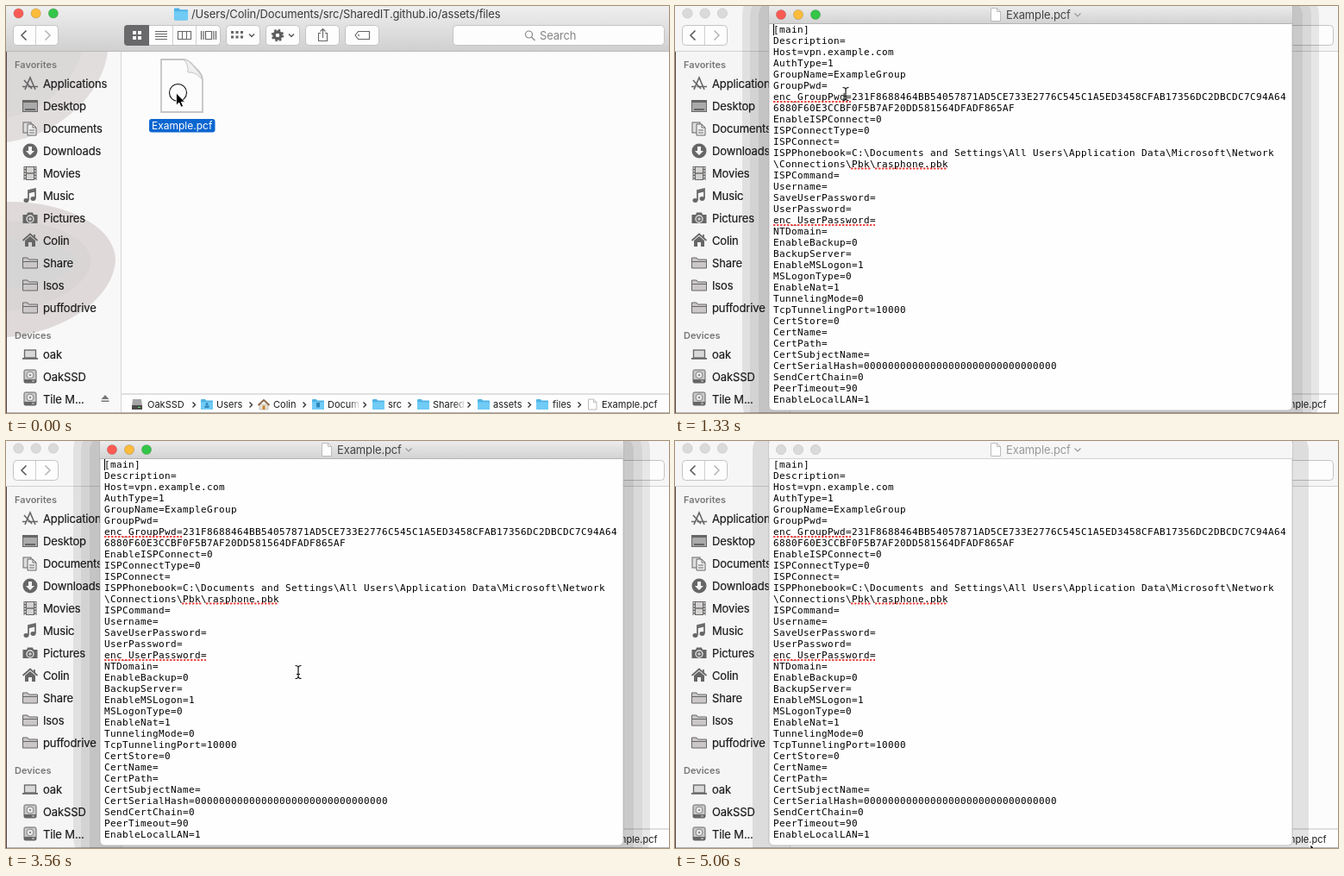
Animation of 769x472 px, one loop 5160 ms. Source, as an HTML page:

```html
<!DOCTYPE html>
<html lang="en">
<head>
<meta charset="utf-8">
<title>Opening a profile</title>
<style>
html, body { margin: 0; width: 100%; height: 100%; overflow: hidden; background: #fcfcfc; }
svg { display: block; width: 769px; height: 472px; }
.ui { font-family: Inter, "Open Sans", sans-serif; font-size: 13px; letter-spacing: -.13px; }
.side { stroke: #1c1c1c; stroke-width: .2px; }
.small { font-size: 11px; letter-spacing: 0; }
.head { font-weight: 600; }
.mono { font-family: "DejaVu Sans Mono", monospace; font-size: 11px; letter-spacing: .378px; white-space: pre; }
</style>
</head>
<body>
<svg id="stage" viewBox="0 0 769 472" xmlns="http://www.w3.org/2000/svg"></svg>
<script>
const LOOP = 5160;
const stage = document.getElementById('stage');

const rect = (x, y, w, h, fill, more = '') =>
  `<rect x="${x}" y="${y}" width="${w}" height="${h}" fill="${fill}" ${more}/>`;
const circle = (x, y, r, fill, more = '') =>
  `<circle cx="${x}" cy="${y}" r="${r}" fill="${fill}" ${more}/>`;
const line = (d, color = '#5f5f5f', width = 1.2, more = '') =>
  `<path d="${d}" fill="none" stroke="${color}" stroke-width="${width}" ${more}/>`;
const shape = (d, fill, more = '') => `<path d="${d}" fill="${fill}" ${more}/>`;
const label = (x, y, text, cls = '', fill = '#1c1c1c') =>
  `<text x="${x}" y="${y}" class="ui ${cls}" fill="${fill}">${text}</text>`;
const at = (x, y, body) => `<g transform="translate(${x} ${y})">${body}</g>`;
const group = (id, body) => `<g id="${id}">${body}</g>`;
const grad = (id, a, b) =>
  `<linearGradient id="${id}" x2="0" y2="1"><stop stop-color="${a}"/><stop offset="1" stop-color="${b}"/></linearGradient>`;

const lights = (x, y, step, active) => ['#fb5b54', '#fcbb3b', '#34c648'].map((c, i) =>
  circle(x + i * step, y, 5.6, active ? c : '#dadada',
    `stroke="${active ? '#00000030' : '#c9c9c9'}" stroke-width=".8"`)).join('');

// Sidebar icons, centred on the origin
const INK = '#666';
const disk = rect(-7, -8, 14, 15, '#c9c9c9', `rx="1.5" stroke="${INK}"`) +
  circle(0, -2, 4, '#e6e6e6', 'stroke="#888"') + circle(0, -2, 1, INK) + rect(-7, 3, 14, 4, INK) + rect(2, 4.5, 3, 1, '#ddd');
const folder = shape('M-8.5 6V-6H-3L-1.5-4H8.5V6Z', '#cbc7c8', `stroke="${INK}"`) + line('M-8.5-1.5H8.5', INK, 1);
const icons = {
  apps: line('M-6 7L0-7L6 7M-9 3.5H-5M-2.5 3.5H9M-7-4L2 6', INK, 1.6),
  desk: rect(-8.5, -6.5, 17, 13, '#aaa', `stroke="${INK}"`) + rect(-8, -6, 16, 2, INK) + rect(-6, 3, 12, 2, INK),
  docs: rect(-8, -7, 9, 12, '#ddd', `stroke="${INK}"`) + shape('M-3-5H3L7-1V8H-3Z', '#eee', `stroke="${INK}"`) + line('M3-5V-1H7M-1 2H5M-1 5H5', INK, 1),
  down: circle(0, 0, 8.5, INK) + shape('M-2-5H2V0H5L0 5L-5 0H-2Z', '#f5f5f5'),
  film: rect(-7.5, -8, 15, 16, INK) + rect(-4, -7, 8, 6.3, '#d5d2d2') + rect(-4, .7, 8, 6.3, '#d5d2d2') +
    line('M-5.8-7V8M5.8-7V8', '#e4e4e4', 1.6, 'stroke-dasharray="1.8 1.6"'),
  note: line('M-2 5V-6L6-8V3', INK, 1.7) + line('M-2-4L6-6', INK, 2.4) +
    '<ellipse cx="-4.5" cy="5.5" rx="3" ry="2.4" fill="#666"/><ellipse cx="3.5" cy="3.5" rx="3" ry="2.4" fill="#666"/>',
  photo: shape('M-8.5 6V-4H-4L-3-6.5H3L4-4H8.5V6Z', INK) + circle(0, 1, 4, INK, 'stroke="#e4e4e4" stroke-width="1.3"') + circle(0, 1, 1.8, '#ccc'),
  home: line('M-8.5 0L0-7.5L8.5 0M5-7V-3', INK, 1.7) + shape('M-6 0L0-5L6 0V7H2V2H-2V7H-6Z', INK),
  folder, disk,
  laptop: rect(-6.5, -5, 13, 9, '#d8d8d8', `stroke="${INK}" stroke-width="1.3"`) + rect(-9, 4, 18, 1.8, INK)
};

const places = [
  ['apps', 'Applications'], ['desk', 'Desktop'], ['docs', 'Documents'], ['down', 'Downloads'],
  ['film', 'Movies'], ['note', 'Music'], ['photo', 'Pictures'], ['home', 'Colin'],
  ['folder', 'Share'], ['folder', 'Isos'], ['folder', 'puffodrive']
];
const devices = [['laptop', 'oak'], ['disk', 'OakSSD'], ['disk', 'Tile M...']];
const rows = (list, top) => list.map(([icon, name], i) => {
  const y = top + 26 * i;
  return at(28, y, icons[icon]) + label(43, y + 4.7, name, 'side');
}).join('');

function sidebar(active) {
  const tint = active
    ? shape('M0 53H118C112 102 62 150 0 158Z', '#e2dddd') + shape('M0 53H88C78 90 44 122 0 130Z', '#dbd8d8') +
      shape('M0 227C62 225 127 253 127 295C125 337 70 379 0 384Z', '#dfd9d9') +
      shape('M0 250C50 248 98 268 98 296C96 326 50 350 0 354Z', '#d9d5d5') +
      shape('M0 270C36 268 82 280 82 296C80 312 36 326 0 328Z', '#d5d5d5')
    : '';
  return rect(0, 53, 133, 419, active ? '#f9f8f8' : '#f5f5f5') + tint +
    rect(133, 53, 1, 419, '#d6d6d6') +
    label(10, 72, 'Favorites', 'small head', '#777') + rows(places, 90) +
    label(10, 386, 'Devices', 'small head', '#777') + rows(devices, 404) +
    shape('M110.5 456L115 451L119.5 456ZM110.5 457.5H119.5V459H110.5Z', '#777');
}

const button = (x, w) => rect(x + .5, 22.5, w, 23, '#fdfdfd', 'rx="4" stroke="#c3c3c3"');
const chevron = x => line(`M${x - 3} 32.5L${x} 35.5L${x + 3} 32.5`, '#555', 1.4);
const dots = (x, y, size, gap, cols, fill) => {
  let out = '';
  for (let i = 0; i < cols * 2; i++) out += rect(x + (i % cols) * gap, y + Math.floor(i / cols) * gap, size, size, fill);
  return out;
};

function toolbar(active) {
  return rect(0, 0, 769, 53, active ? 'url(#bar)' : '#f6f6f6') + rect(0, 52, 769, 1, active ? '#b9b9b9' : '#d2d2d2') +
    lights(14.5, 8.5, 20.2, active) +
    at(203, 9.5, blueFolder(1.15)) +
    label(215, 14.3, '/Users/Colin/Documents/src/SharedIT.github.io/assets/files', '', '#3a3a3a') +
    button(8, 52) + rect(34, 23, 1, 22, '#cfcfcf') +
    line('M23.5 28.5L18 34L23.5 39.5', '#555', 1.5) + line('M45.5 28.5L51 34L45.5 39.5', '#b5b5b5', 1.5) +
    button(137, 111) + shape('M141 22H166V46H141Q137 46 137 42V26Q137 22 141 22Z', '#69696b') +
    rect(193, 23, 1, 22, '#d0d0d0') + rect(220, 23, 1, 22, '#d0d0d0') +
    dots(147, 29, 4, 6, 2, '#fff') + line('M173 29.5H187M173 32.5H187M173 35.5H187M173 38.5H187', '#666', 1) +
    line('M199.5 29.5H214.5V38.5H199.5ZM204.5 29V39M209.5 29V39', '#666', 1.1) +
    line('M231.5 29.5H238.5V38.5H231.5ZM229 29V39M226.5 29V39M241 29V39M243.5 29V39', '#666', 1.2) +
    button(255, 39) + dots(261, 29, 3, 5.5, 3, '#666') + chevron(285) +
    button(301, 39) + circle(315, 34, 4, 'none', 'stroke="#5d5d5d" stroke-width="3.4"') +
    circle(315, 34, 6.2, 'none', 'stroke="#5d5d5d" stroke-width="2" stroke-dasharray="2.5 2.37"') + chevron(331) +
    button(347, 39) + line('M365 31.5H362.5V40.5H372.5V31.5H370M367.5 37V26.5M364.5 29.5L367.5 26.5L370.5 29.5', '#666', 1.1) +
    button(393, 39) + line('M405 34L408.5 29.5H421.5V38.5H408.5Z', '#666', 1.2, 'stroke-linejoin="round"') + circle(409, 34, .9, '#666') +
    button(518, 245) + circle(606.5, 33, 4, 'none', 'stroke="#858585" stroke-width="1.2"') + line('M609.5 36L613.5 40', '#858585', 1.3) +
    label(619, 38.8, 'Search', '', '#858585');
}

function blueFolder(s = 1) {
  return `<g transform="scale(${s})">` + shape('M-7 5V-5Q-7-6-6-6H-2L-1-4.5H6Q7-4.5 7-3.5V5Q7 6 6 6H-6Q-7 6-7 5Z', '#4eb3e6') +
    rect(-7, -2.8, 14, 8.8, '#70cbf5', 'rx="1"') + '</g>';
}
const page = (w, h, cut) => shape(`M0 0H${w - cut}L${w} ${cut}V${h}H0Z`, '#fefefe', 'stroke="#bcbcbc"') +
  line(`M${w - cut} 0V${cut}H${w}`, '#bcbcbc', 1);

function pathBar() {
  const steps = [
    [152, 164, 'OakSSD'], [233, 244, 'Users'], [299, 310, 'Colin'], [362, 373, 'Docum'], [432, 443, 'src'],
    [484, 495, 'Share' + 'd'], [554, 565, 'assets'], [622, 634, 'files']
  ];
  const gaps = [218, 284, 346, 416, 468, 537, 607, 665];
  return rect(134, 450, 635, 22, '#fdfdfd') + rect(134, 449.5, 635, 1, '#c4c4c4') +
    steps.map(([x, tx, name], i) => {
      const icon = i === 0
        ? shape('M-5-6H5L6 2V6H-6V2Z', '#a5a5a5') + rect(-6, 1, 12, 5, '#4a4a4a') + rect(1, 3, 3, 1, '#6cd46c')
        : i === 2
          ? shape('M-5 0H5V6H-5Z', '#e9e3d4', 'stroke="#aaa" stroke-width=".6"') + line('M-6.5 1L0-5L6.5 1', '#8b6546', 1.8) + rect(-1.5, 1.5, 3, 4.5, '#c98432')
          : blueFolder() + (i === 1 ? circle(0, -.5, 1.5, '#2d87bb') + rect(-2.5, 1.5, 5, 2.5, '#2d87bb') : i === 3 ? rect(-2, -2, 4, 5.5, '#2d87bb') : '');
      const fill = i === 3 || i === 5 ? 'url(#fade)' : '#1c1c1c';
      return at(x, 462, icon) + label(tx, 466, name, 'small', fill) +
        line(`M${gaps[i] - 1.5} 459.5L${gaps[i] + 1.5} 462.5L${gaps[i] - 1.5} 465.5`, '#333', 1.4);
    }).join('') +
    at(675.5, 456, page(9.5, 12, 3.5)) + label(691, 466, 'Example.pcf', 'small') +
    rect(0, 471, 769, 1, '#b5b5b5');
}

const file = shape('M180 62H206Q212 63 217 69L224 76Q228 81 228 86V123H180Z', '#fcfcfc', 'stroke="#c4c4c4" stroke-width="1.8"') +
  shape('M206 62Q212 68 211 77Q221 76 228 86Q227 80 222 75L215 67Q211 62 206 62Z', '#f0f0f0', 'stroke="#c4c4c4"') +
  rect(166, 131, 76.5, 15.5, '#0b66d0', 'rx="3"') + label(169, 143, 'Example.pcf', '', '#fff" style="font-size:12px;letter-spacing:0');

const finder = active => rect(134, 53, 635, 397, '#fcfcfc') + sidebar(active) + toolbar(active) +
  file + pathBar() + rect(0, 53, 1, 419, '#5a4444');

const config = String.raw`[main]
Description=
Host=vpn.example.com
AuthType=1
GroupName=ExampleGroup
GroupPwd=
enc_GroupPwd=231F8688464BB54057871AD5CE733E2776C545C1A5ED3458CFAB17356DC2DBCDC7C94A64
6880F60E3CCBF0F5B7AF20DD581564DFADF865AF
EnableISPConnect=0
ISPConnectType=0
ISPConnect=
ISPPhonebook=C:\Documents and Settings\All Users\Application Data\Microsoft\Network
\Connections\Pbk\rasphone.pbk
ISPCommand=
Username=
SaveUserPassword=
UserPassword=
enc_UserPassword=
NTDomain=
EnableBackup=0
BackupServer=
EnableMSLogon=1
MSLogonType=0
EnableNat=1
TunnelingMode=0
TcpTunnelingPort=10000
CertStore=0
CertName=
CertPath=
CertSubjectName=
CertSerialHash=00000000000000000000000000000000
SendCertChain=0
PeerTimeout=90
EnableLocalLAN=1`.split('\n');

const misspelt = (x, y, end) => line(`M${x + 1} ${y}H${end}`, '#f0403c', 2, 'stroke-dasharray="0 4" stroke-linecap="round"') +
  line(`M${x} ${y}H${end}`, '#f0403c', 1.6, 'stroke-dasharray="2.6 1.4"');

// Stepped soft shadow around the editor window
const shadow = bands => bands.map(([spread, alpha]) =>
  rect(109 - spread, 6 - spread, 607 + spread * 2, 520, '#000', `rx="${spread + 5}" fill-opacity="${alpha}"`)).join('');

function editor(active) {
  const ink = active ? '#454545' : '#9a9a9a';
  return shadow(active ? [[31, .085], [22, .06], [12, .07]] : [[19, .1]]) +
    rect(109, -6, 607, 475, '#fefefe', 'rx="5" stroke="#a9a9a9" stroke-width=".7"') +
    shape('M109 20V4Q109 0 113 0H712Q716 0 716 4V20Z', active ? 'url(#title)' : '#f6f6f6') +
    rect(109, 20, 607, 1, active ? '#b4b4b4' : '#d2d2d2') +
    lights(123, 10, 20, active) +
    at(366.5, 2.5, page(11, 15, 4)) + label(384, 14.7, 'Example.pcf', '', ink) +
    line('M463.5 8.5L467 12L470.5 8.5', '#999', 1.2) +
    config.map((text, i) => `<text class="mono" x="114" y="${31 + 13 * i}" fill="#000">${text}</text>`).join('') +
    misspelt(114, 111, 204) + misspelt(114, 254, 232) + misspelt(204, 188.5, 227) + misspelt(232, 188.5, 316);
}

const arrow = shape('M0 0V14L3.3 11L5.6 16.2L8 15.2L5.8 10.2H10Z', '#000', 'stroke="#fff" stroke-width=".8"');
const beam = line('M-3.5-7.5Q0-7.5 0-5Q0-7.5 3.5-7.5M0-5V5M-3.5 7.5Q0 7.5 0 5Q0 7.5 3.5 7.5M-2 2.5H2', '#111', 1.2);

stage.innerHTML = `<defs>${grad('bar', '#f0efef', '#d0cfd0')}${grad('title', '#ebebeb', '#d3d3d3')}
  <linearGradient id="fade"><stop offset=".68" stop-color="#1c1c1c"/><stop offset="1" stop-color="#1c1c1c" stop-opacity=".08"/></linearGradient></defs>` +
  group('front', finder(true)) + group('back', finder(false)) +
  group('edit', editor(true)) + group('editIdle', editor(false)) +
  group('caret', rect(114, 21, 1, 13, '#000')) +
  group('ring', circle(199.5, 100.5, 10, 'none', 'stroke="#111" stroke-width="1.1"')) +
  group('arrow', arrow) + group('beam', beam);

const parts = Object.fromEntries([...stage.querySelectorAll('g[id]')].map(g => [g.id, g]));
const show = (id, on) => parts[id].setAttribute('display', on ? 'inline' : 'none');
const move = (id, x, y) => parts[id].setAttribute('transform', `translate(${x} ${y})`);
const within = (t, spans) => spans.some(([a, b]) => t >= a && t < b);

const OPEN = 1330, BLUR = 5060;
const clicks = [[0, 140], [740, 890], [1030, 1180]];
const blinks = [[1330, 1920], [2370, 2970], [3560, 4160], [4610, 5060]];
const beamStops = [[1330, 198, 102], [3270, 212, 128], [3420, 266, 199], [3560, 339, 268],
  [3710, 455, 346], [3860, 562, 414], [4010, 653, 463]];

function draw(t) {
  const open = t >= OPEN, blurred = t >= BLUR;
  show('front', !open);
  show('back', open);
  show('edit', open && !blurred);
  show('editIdle', blurred);
  show('caret', within(t, blinks));
  show('ring', within(t, clicks));
  show('arrow', !open || blurred);
  move('arrow', blurred ? 737 : 197.5, blurred ? 468 : 101);
  show('beam', open && t < 4160);
  const [, x, y] = beamStops.filter(s => t >= s[0]).pop() || beamStops[0];
  move('beam', x, y);
}

const start = performance.now();
function tick() {
  draw((performance.now() - start) % LOOP);
  requestAnimationFrame(tick);
}
draw(0);
requestAnimationFrame(tick);
</script>
</body>
</html>
```
